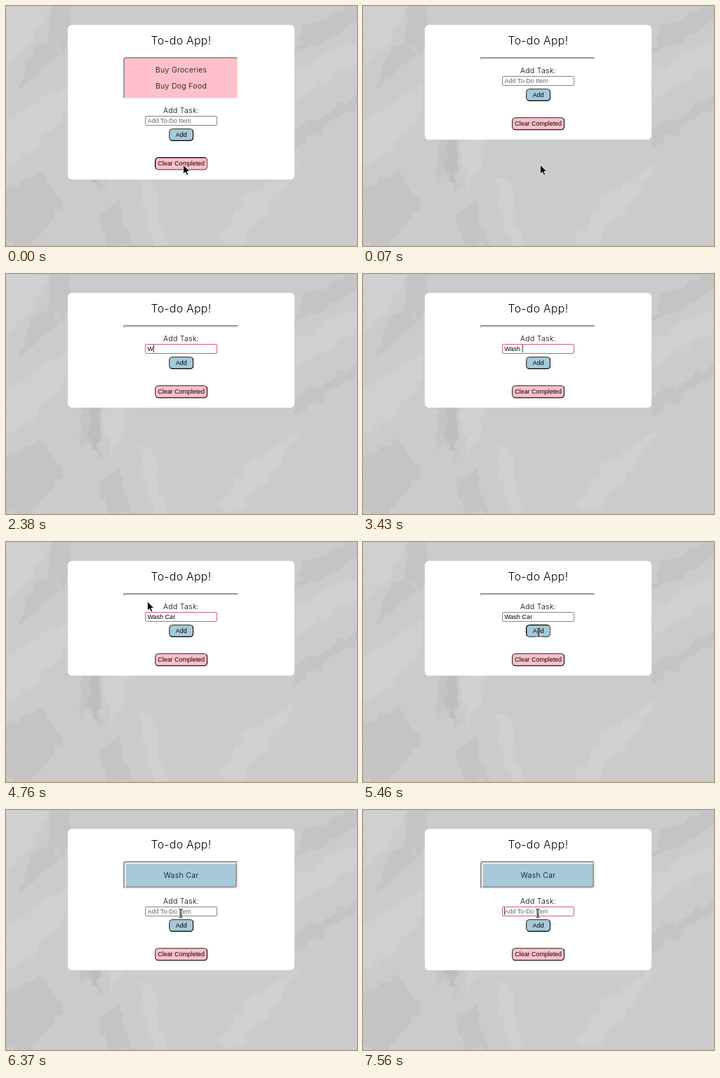
Write an HTML page that moves like this. It is 500 px wide and 343 px high and loops after 8 s.

```html
<!DOCTYPE html>
<html lang="en">
<head>
<meta charset="utf-8">
<title>To-do App</title>
<style>
html, body { margin: 0; width: 100%; height: 100%; overflow: hidden; background: #cbcbcb; }
.stage { position: relative; width: 500px; height: 343px; overflow: hidden; color: #000; font: 300 10.5px/20px Inter, sans-serif; letter-spacing: .03em; }
.stage div, .stage svg { position: absolute; box-sizing: border-box; }
.stage div, .anim { animation: 8s step-end infinite; }
.mid { left: 88px; width: 323px; text-align: center; }
.ui { font: 9px Arial, "Liberation Sans", sans-serif; letter-spacing: 0; white-space: pre; }

.stage .card { left: 88px; top: 27px; width: 323px; border-radius: 6px; background: #fff; animation-name: card; }
@keyframes card { 0% { height: 221px } .875% { height: 164px } 69.125%, 100% { height: 202px } }

.title { top: 39.5px; font-size: 15.8px; }
.stage .list { left: 167px; top: 73px; width: 164px; border: 2px solid; border-color: #9a9a9a #eee #eee #9a9a9a;
  border-radius: 4px; background: #ffc0cb; animation-name: list; }
@keyframes list { 0% { height: 60px } .875% { height: 4px } 69.125%, 100% { height: 40px } }

.stage .old { animation-name: old; }
@keyframes old { 0% { visibility: visible } .875%, 100% { visibility: hidden } }
.stage .new { animation-name: new; }
@keyframes new { 0% { visibility: hidden } 69.125%, 100% { visibility: visible } }
.item { left: 169px; top: 75px; width: 160px; height: 36px; border: 2px solid; border-color: #eee #9a9a9a #9a9a9a #eee;
  border-radius: 4px; background: #a5c9d8; }

.stage .form { left: 0; top: 0; width: 500px; height: 200px; animation-name: form; }
@keyframes form { 0% { transform: translateY(57px) } .875% { transform: none } 69.125%, 100% { transform: translateY(38px) } }

.stage .field { left: 198px; top: 100px; width: 103px; height: 14px; border: 1px solid; border-radius: 2px; background: #fff; animation-name: focus; }
@keyframes focus { 0%, 67.375% { border-color: #858585 } 14.875%, 81.375%, 100% { border-color: #cd5b84 } }
.field div { left: 2.4px; top: 0; height: 12px; line-height: 12px; }
.stage .hint { color: #686868; animation-name: hint; }
@keyframes hint { 0%, 69.125%, 100% { opacity: 1 } 29.75% { opacity: 0 } }
.stage .typed { animation-name: typed; }
@keyframes typed { 0%, 69.125%, 100% { opacity: 0 } 29.75% { opacity: 1 } }
.typed span { font-size: 0; animation: key 8s step-end infinite; }
@keyframes key { 0% { font-size: 9px } 40%, 100% { font-size: 0 } }
.typed i { display: inline-block; width: 1px; height: 11px; margin-right: -1px; vertical-align: -2px; background: #444; animation: 8s step-end infinite caret; }
.stage .caret { left: 0; top: 0; width: 1px; height: 11px; background: #444; animation-name: caret; }
@keyframes caret {
  0%, 21.875%, 56%, 67.375%, 88.375% { opacity: 0 }
  14.875%, 28%, 62.125%, 81.375%, 94.5%, 100% { opacity: 1 }
}

/* Buttons are laid out at 1.5x and shrunk, which gives their 1.33px borders. */
.btn { height: 27px; border: 2px solid; border-radius: 8px; font-size: 13.333px; line-height: 23px; text-align: center;
  transform: scale(.66667); transform-origin: 0 0; }
.stage .add { left: 232px; top: 118px; width: 53px; background: #a5c9d8; animation-name: add; }
@keyframes add { 67.375% { border-color: #000 #4c4c4c #4c4c4c #000 } 0%, 69.125%, 100% { border-color: #4c4c4c #000 #000 #4c4c4c } }
.stage .clear { left: 212px; top: 159px; width: 113px; height: 28px; line-height: 24px; background: #ffc0cb; animation-name: clear; }
@keyframes clear { 0% { border-color: #000 #4c4c4c #4c4c4c #000 } .875%, 100% { border-color: #4c4c4c #000 #000 #4c4c4c } }

.stage .mouse { left: 0; top: 0; width: 0; height: 0; animation-name: move; }
@keyframes move {
  0% { transform: translate(252px, 227px) }
  2.625% { transform: translate(252px, 227px); animation-timing-function: steps(3) }
  5.25% { transform: translate(290px, 150px); animation-timing-function: steps(3) }
  7.875% { transform: translate(262px, 52px); animation-timing-function: steps(3) }
  10.5% { transform: translate(204px, 92px); animation-timing-function: steps(3) }
  13.125% { transform: translate(246px, 108px) }
  57.75% { transform: translate(246px, 108px); animation-timing-function: steps(2) }
  59.5% { transform: translate(201px, 85px); animation-timing-function: steps(3) }
  62.125% { transform: translate(276px, 155px); animation-timing-function: steps(4) }
  65.625% { transform: translate(250px, 129px) }
  74.375% { transform: translate(250px, 129px); animation-timing-function: steps(6) }
  79.625%, 100% { transform: translate(249px, 147.5px) }
}
.mouse svg { left: 0; top: 0; overflow: visible; }
.arrow { animation-name: arrow; }
@keyframes arrow { 0%, 59.5% { opacity: 1 } 13.125%, 65.625%, 100% { opacity: 0 } }
.beam { animation-name: beam; }
@keyframes beam { 0%, 29.75%, 59.5% { opacity: 0 } 13.125%, 58.625%, 65.625%, 100% { opacity: 1 } }
</style>
</head>
<body>
<div class="stage">
  <svg width="500" height="343" viewBox="0 0 500 343">
    <filter id="paper" x="-10%" y="-10%" width="120%" height="120%">
      <feTurbulence type="fractalNoise" baseFrequency=".05" numOctaves="3" seed="4"/>
      <feDisplacementMap in="SourceGraphic" scale="22" xChannelSelector="R" yChannelSelector="G"/>
      <feGaussianBlur stdDeviation=".7"/>
    </filter>
    <rect width="500" height="343" fill="#cbcbcb"/>
    <g filter="url(#paper)">
      <g fill="#fff" fill-opacity=".09">
        <path d="M0 0H66L40 42 24 62 0 90Z"/>
        <path d="M0 165L88 110V150L30 215 0 230Z"/>
        <path d="M136 190H175L165 235 148 262Z"/>
        <path d="M190 238L210 262 228 343H208Z"/>
        <path d="M411 95L500 45V80L411 135Z"/>
        <path d="M300 330L345 270 420 225 380 285 330 343Z"/>
      </g>
      <g fill="#000" fill-opacity=".035">
        <path d="M68 0H92L88 68 60 50Z"/>
        <path d="M30 70L60 50 80 70 20 120Z"/>
        <path d="M100 190H138L132 222 136 268 118 240 106 252Z"/>
        <path d="M118 190H134L130 262 120 228Z"/>
        <path d="M0 262L50 240 84 278 70 304 30 343H0Z"/>
        <path d="M130 300L160 275 182 343H146Z"/>
        <path d="M425 28L500 0V22L411 72Z"/>
        <path d="M411 180L500 125V140L411 205Z"/>
      </g>
    </g>
  </svg>

  <div class="card"></div>
  <div class="mid title">To-do App!</div>
  <div class="list"></div>
  <div class="mid old" style="top:81.5px">Buy Groceries</div>
  <div class="mid old" style="top:105px">Buy Dog Food</div>
  <div class="item new"></div>
  <div class="mid new" style="top:83.5px">Wash Car</div>

  <div class="form">
    <div class="mid" style="top:83px">Add Task:</div>
    <div class="field ui">
      <div class="hint">Add To-Do Item<div class="caret"></div></div>
      <div class="typed"><span style="animation-delay:2.38s">W</span><span style="animation-delay:2.59s">a</span><span style="animation-delay:3.08s">s</span><span style="animation-delay:3.29s">h</span><span style="animation-delay:3.43s"> </span><span style="animation-delay:3.71s">C</span><span style="animation-delay:3.92s">a</span><span style="animation-delay:3.99s">r</span><i></i></div>
    </div>
    <div class="ui btn add">Add</div>
    <div class="ui btn clear">Clear Completed</div>
  </div>

  <div class="mouse">
    <svg class="anim arrow" width="12" height="18"><path d="M.5 0V13L3.5 10.3 5.7 15 7.8 14 5.7 9.5H9.8Z" stroke="#fff" stroke-width=".8"/></svg>
    <svg class="anim beam" width="10" height="16" fill="none" stroke-linecap="round">
      <path id="bar" d="M-2.5 -6Q0 -6 0 -4.5Q0 -6 2.5 -6M0 -4.5V4.5M-2.5 6Q0 6 0 4.5Q0 6 2.5 6M-1.5 2H1.5"/>
      <use href="#bar" stroke="#fff" stroke-width="2.4" stroke-opacity=".8"/>
      <use href="#bar" stroke="#111" stroke-width="1.1"/>
    </svg>
  </div>
</div>
</body>
</html>
```
